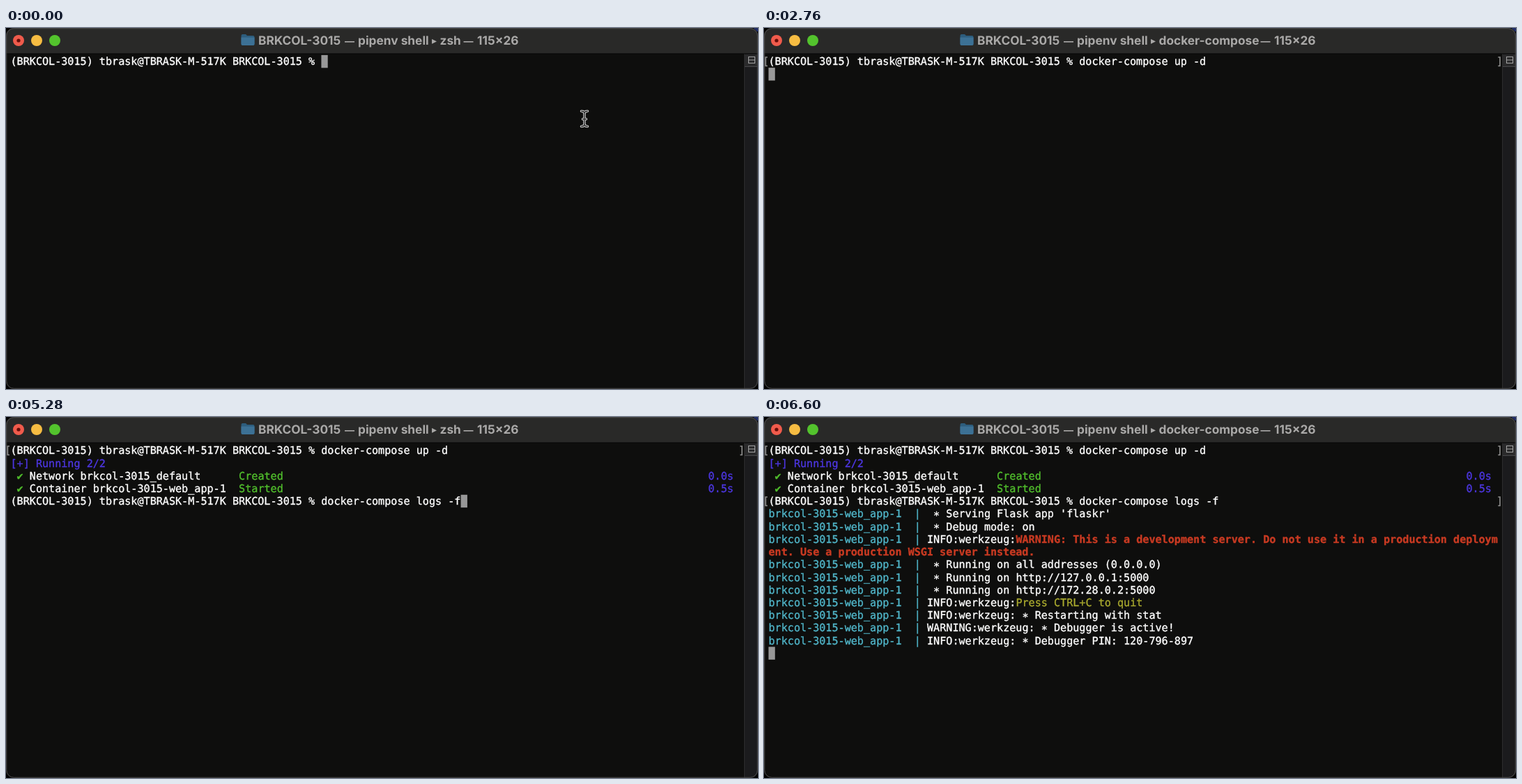
Write an HTML page that moves like this. It is 1079 px wide and 519 px high and loops after 9360 ms.

```html
<!DOCTYPE html>
<html lang="en">
<head>
<meta charset="utf-8">
<title>Terminal</title>
<style>
  html, body { margin: 0; width: 100%; height: 100%; overflow: hidden; background: #000; }
  svg { display: block; width: 100%; height: 100%; }
  text { white-space: pre; text-rendering: geometricPrecision; }
  #screen { font: 15.115px "DejaVu Sans Mono", monospace; }
  #screen text { stroke: currentColor; stroke-width: .35px; fill: currentColor; }
  .white { color: #fff; }
  .blue { color: #4c36df; }
  .green { color: #50bd2c; }
  .cyan { color: #50b5c8; }
  .yellow { color: #a9a92e; }
  .red { color: #c83a22; font-weight: 700; }
  .mark { color: #929292; }
  #title { font: 700 17.3px Inter, sans-serif; fill: #aaa9a8; }
  #title .dash { font-size: 14px; }
  #title .arrow { font: 14px "DejaVu Sans", sans-serif; }
</style>
</head>
<body>
<svg viewBox="0 0 1079 519" preserveAspectRatio="none">
  <defs>
    <clipPath id="window"><rect width="1079" height="519" rx="11"/></clipPath>
    <path id="beam" d="M825.5 119.500q4.500 0 4.500 3.500v15q0 3.500-4.500 3.500M834.500 119.500q-4.500 0-4.500 3.500v15q0 3.500 4.500 3.500M827.500 131h5"/>
  </defs>
  <rect x="1073" width="6" height="5" fill="#202c66"/>
  <g clip-path="url(#window)">
    <rect width="1079" height="519" fill="#0e0e0d"/>
    <rect width="1079" height="37" fill="#292928"/>
    <rect y="36.5" width="1079" height="1" fill="#050505"/>
    <rect x="1059.5" y="37.5" width="20" height="482" fill="#1b1b1d"/>
    <path d="M1059.5 37.5V519" stroke="#2c2c2d"/>
    <rect x="1060" y="38" width="18" height="17.5" fill="#2a2a2b"/>
    <path d="M1060 55.5H1078" stroke="#48484a"/>
    <path d="M1065.5 41.5h9v9h-9zM1065.5 46h9" fill="none" stroke="#a2a2a2" stroke-width="1.1"/>
  </g>
  <rect x=".75" y=".75" width="1077.5" height="517.5" rx="10.5" fill="none" stroke="#4c4c4c"/>
  <circle cx="18" cy="18" r="8" fill="#f05b4c"/>
  <circle cx="18" cy="18" r="2.6" fill="#650d09"/>
  <circle cx="44" cy="18" r="8" fill="#f6bc42"/>
  <circle cx="70" cy="18" r="8" fill="#53c32d"/>

  <g id="title">
    <g id="titleStart">
      <path d="M337.5 11q0-2 2-2h4.5l2 2h8.5q2 0 2 2v10q0 2-2 2h-15q-2 0-2-2z" fill="#2d5d7d"/>
      <path d="M337.5 13.5h19v9.5q0 2-2 2h-15q-2 0-2-2z" fill="#3c7195"/>
      <text x="362" y="23.5">BRKCOL-3015</text>
      <text class="dash" x="486" y="23.5">—</text>
      <text x="505" y="23.5">pipenv shell</text>
      <text class="arrow" x="611" y="23">▸</text>
      <text id="process" x="622.5" y="23.5"></text>
    </g>
    <g id="titleEnd">
      <text class="dash" x="656.5" y="23.5">—</text>
      <text x="676" y="23.5">115×26</text>
    </g>
  </g>

  <g id="screen"></g>
  <g id="pointer" fill="none" stroke-linecap="round" stroke-linejoin="round">
    <use href="#beam" stroke="#c8c8c8" stroke-width="3.6"/>
    <use href="#beam" stroke="#303030" stroke-width="1.4"/>
  </g>
</svg>
<script>
const LOOP = 9360, LEFT = 6.5, CELL = 9.1, TOP = 38.9, LINE = 18.22;
const PROMPT = '(BRKCOL-3015) tbrask@TBRASK-M-517K BRKCOL-3015 % ';
const SERVICE = 'brkcol-3015-web_app-1';
const UP = 'docker-compose up -d';
const LOGS = 'docker-compose logs -f';

const titles = [[0, 'zsh'], [2640, 'docker-compose'], [3400, 'zsh'], [6480, 'docker-compose']];
const firstCommand = [[0, ''], [120, UP]];
const secondCommand = [[3320, ''], [4280, UP], [4760, 'docker-compose '], [5280, LOGS]];
const progress = [[2920, ['⠋', 1]], [3040, ['⠙', 2]], [3120, ['⠹', 3]], [3240, ['⠸', 4]], [3320, ['✔', 5]]];
const moments = [80, 2520, 6440, 6600,
  ...[titles, firstCommand, secondCommand, progress].flatMap(table => table.map(([start]) => start))]
  .sort((a, b) => a - b);

// Each message: text, colour, and text before the coloured part.
const messages = [
  [" * Serving Flask app 'flaskr'"],
  [' * Debug mode: on'],
  ['WARNING: This is a development server. Do not use it in a production deployment. Use a production WSGI server instead.', 'red', 'INFO:werkzeug:'],
  [' * Running on all addresses (0.0.0.0)'],
  [' * Running on http://127.0.0.1:5000'],
  [' * Running on http://172.28.0.2:5000'],
  ['Press CTRL+C to quit', 'yellow', 'INFO:werkzeug:'],
  ['INFO:werkzeug: * Restarting with stat'],
  ['WARNING:werkzeug: * Debugger is active!'],
  ['INFO:werkzeug: * Debugger PIN: 120-796-897']
];

const $ = id => document.getElementById(id);
const valueAt = (table, t) => table.findLast(([start]) => t >= start)[1];
const centreStars = s => s.replace(/\*(.)/g, '<tspan dy="2.6">*</tspan><tspan dy="-2.6">$1</tspan>');

function textAt(x, row, text, color) {
  const y = TOP + 14.4 + row * LINE;
  return `<text class="${color}" x="${x.toFixed(2)}" y="${y.toFixed(2)}">${centreStars(text)}</text>`;
}

const run = (col, row, text, color = 'white') => textAt(LEFT + col * CELL, row, text, color);

const cursor = (col, row) =>
  `<rect x="${LEFT + col * CELL}" y="${TOP + row * LINE}" width="9.3" height="18.4" fill="#989898"/>`;

function commandLine(row, command, entered) {
  const line = run(0, row, PROMPT + command);
  return entered
    ? line + textAt(-1.7, row, '[', 'mark') + textAt(1051, row, ']', 'mark')
    : line + cursor(PROMPT.length + command.length, row);
}

function task(row, icon, name, status, time, done) {
  return run(1, row, icon, 'green') + run(3, row, name) +
    run(36, row, status, done ? 'green' : 'white') + run(110, row, time, 'blue');
}

function startup(t) {
  const [icon, tenths] = valueAt(progress, t);
  const done = tenths === 5;
  return run(0, 1, `[+] Running ${done ? 2 : 1}/2`, done ? 'blue' : 'white') +
    task(2, '✔', 'Network brkcol-3015_default', 'Created', '0.0s', true) +
    task(3, icon, 'Container ' + SERVICE, done ? 'Started' : 'Starting', `0.${tenths}s`, done);
}

function logOutput() {
  let row = 5, out = '';
  for (const [text, color, prefix = ''] of messages) {
    const col = 25 + prefix.length, room = 115 - col;
    out += run(0, row, SERVICE + '  |', 'cyan') + run(25, row, prefix) +
      run(col, row, text.slice(0, room), color);
    row++;
    if (text.length > room) out += run(0, row++, text.slice(room), color);
  }
  return out + cursor(0, row);
}

function screenAt(t) {
  let out = commandLine(0, valueAt(firstCommand, t), t >= 2520);
  if (t >= 2520 && t < 2920) out += cursor(0, 1);
  if (t >= 2920) out += startup(t);
  if (t >= 3320) out += commandLine(4, valueAt(secondCommand, t), t >= 6440);
  if (t >= 6440) out += t < 6600 ? cursor(0, 5) : logOutput();
  return out;
}

function draw(t) {
  const process = valueAt(titles, t);
  const shift = process === 'zsh' ? 0 : 56;
  $('process').textContent = process;
  $('titleStart').setAttribute('transform', `translate(${-shift})`);
  $('titleEnd').setAttribute('transform', `translate(${shift})`);
  $('pointer').style.display = t < 80 ? '' : 'none';
  $('screen').innerHTML = screenAt(t);
}

const began = performance.now();
let shown = -1;
function tick() {
  const t = (performance.now() - began) % LOOP;
  const moment = moments.findLast(start => t >= start);
  if (moment !== shown) draw(shown = moment);
  requestAnimationFrame(tick);
}
tick();
</script>
</body>
</html>
```
